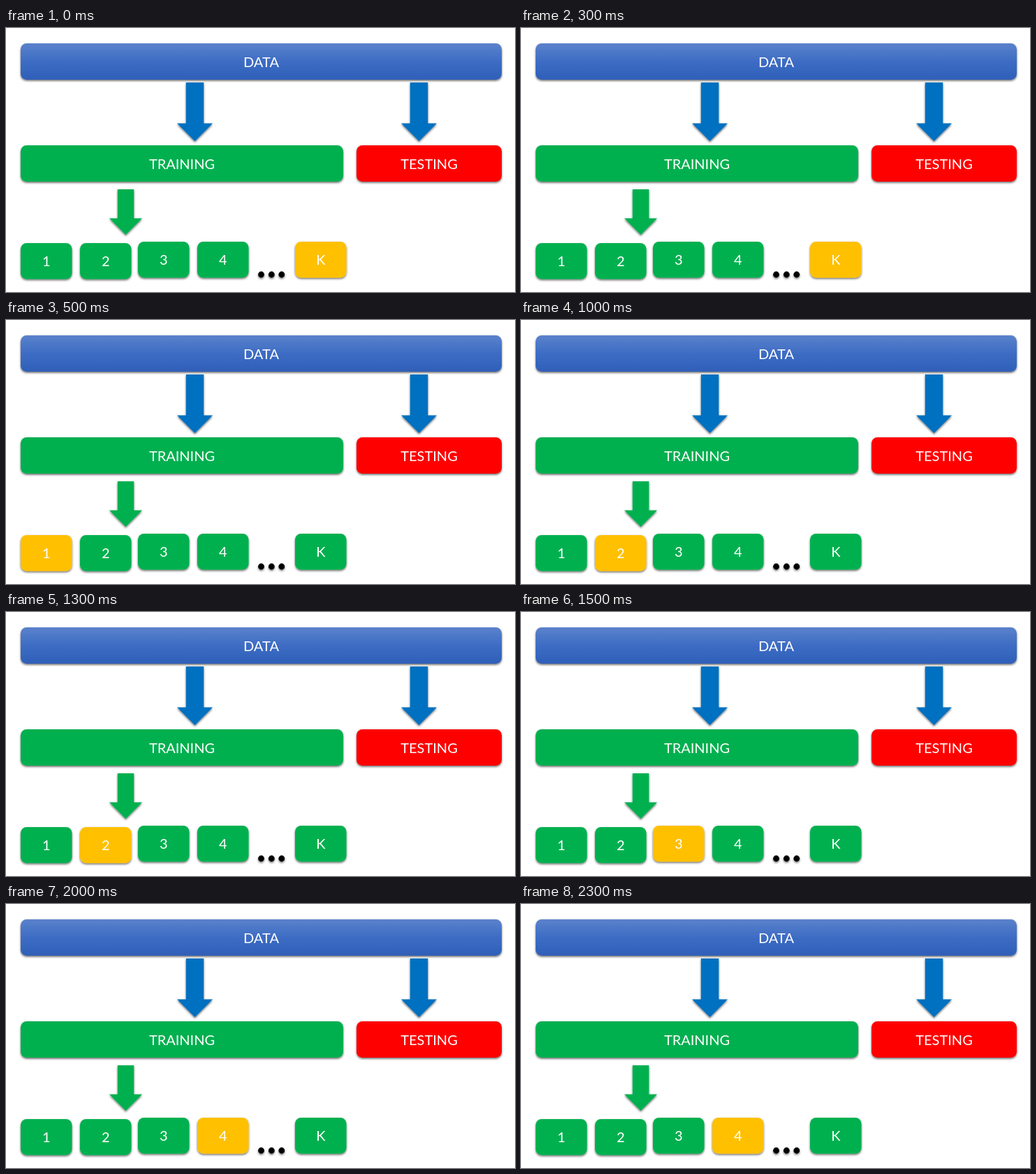
These frames come from a looping animation (729 px wide and 378 px high, 2.5 s). An HTML page:

```html
<!DOCTYPE html>
<html lang="en">
<head>
<meta charset="utf-8">
<title>K-fold split</title>
<style>
  html, body { margin: 0; width: 100%; height: 100%; overflow: hidden; background: #fff; }
  svg { display: block; width: 729px; height: 378px; }
  text { font-family: Lato, Carlito, sans-serif; font-size: 20px; fill: #fff; text-anchor: middle; }
</style>
</head>
<body>
<svg id="stage" viewBox="0 0 729 378">
  <defs>
    <linearGradient id="blue" x1="0" y1="0" x2="0" y2="1">
      <stop offset="0" stop-color="#5b82cb"/>
      <stop offset=".5" stop-color="#3d6cc4"/>
      <stop offset="1" stop-color="#2f5fb8"/>
    </linearGradient>
    <filter id="shadow" filterUnits="userSpaceOnUse" x="0" y="0" width="729" height="378">
      <feDropShadow dx="0" dy="1.6" stdDeviation="1.5" flood-color="#000" flood-opacity=".6"/>
    </filter>
  </defs>
</svg>
<script>
const GREEN = '#00b050', GOLD = '#ffc000', BLUE = '#0070c0', RED = '#ff0000';
const STEP = 500;
const stage = document.getElementById('stage');

function add(tag, attrs, text) {
  const el = document.createElementNS('http://www.w3.org/2000/svg', tag);
  for (const key in attrs) el.setAttribute(key, attrs[key]);
  if (text) el.textContent = text;
  return stage.appendChild(el);
}

function box(label, x, y, width, height, fill) {
  const rect = add('rect', { x, y, width, height, rx: 8.5, fill, filter: 'url(#shadow)' });
  add('text', { x: x + width / 2, y: y + height / 2 + 7.5 }, label);
  return rect;
}

// Downward arrow centred on cx: shaft half-width s, head half-width h
function arrow(cx, top, neck, tip, s, h, fill) {
  const d = `M${cx - s} ${top}H${cx + s}V${neck}H${cx + h}L${cx} ${tip}L${cx - h} ${neck}H${cx - s}Z`;
  add('path', { d, fill, filter: 'url(#shadow)' });
}

box('DATA', 21, 22, 689, 52, 'url(#blue)');
arrow(270.5, 78, 136.5, 162, 12.7, 25.5, BLUE);
arrow(591.5, 78, 136.5, 162, 12.7, 25.5, BLUE);
box('TRAINING', 21, 168, 462, 52, GREEN);
box('TESTING', 502, 168, 208, 52, RED);
arrow(171.5, 231, 272.5, 296, 11.7, 23.5, GREEN);

const folds = [['1', 21, 308], ['2', 106, 308], ['3', 189, 306], ['4', 274, 306], ['K', 414, 306]]
  .map(([label, x, y]) => box(label, x, y, 73.5, 51.5, GREEN));

for (const cx of [365.5, 380.3, 394.8]) {
  add('circle', { cx, cy: 353, r: 4.4, fill: '#000', filter: 'url(#shadow)' });
}

// The held-out fold starts at K, then runs 1 to 4
function draw(ms) {
  const held = (Math.floor(ms / STEP) + folds.length - 1) % folds.length;
  folds.forEach((rect, i) => rect.setAttribute('fill', i === held ? GOLD : GREEN));
}

const start = performance.now();
function tick() {
  draw(performance.now() - start);
  requestAnimationFrame(tick);
}
tick();
</script>
</body>
</html>
```
